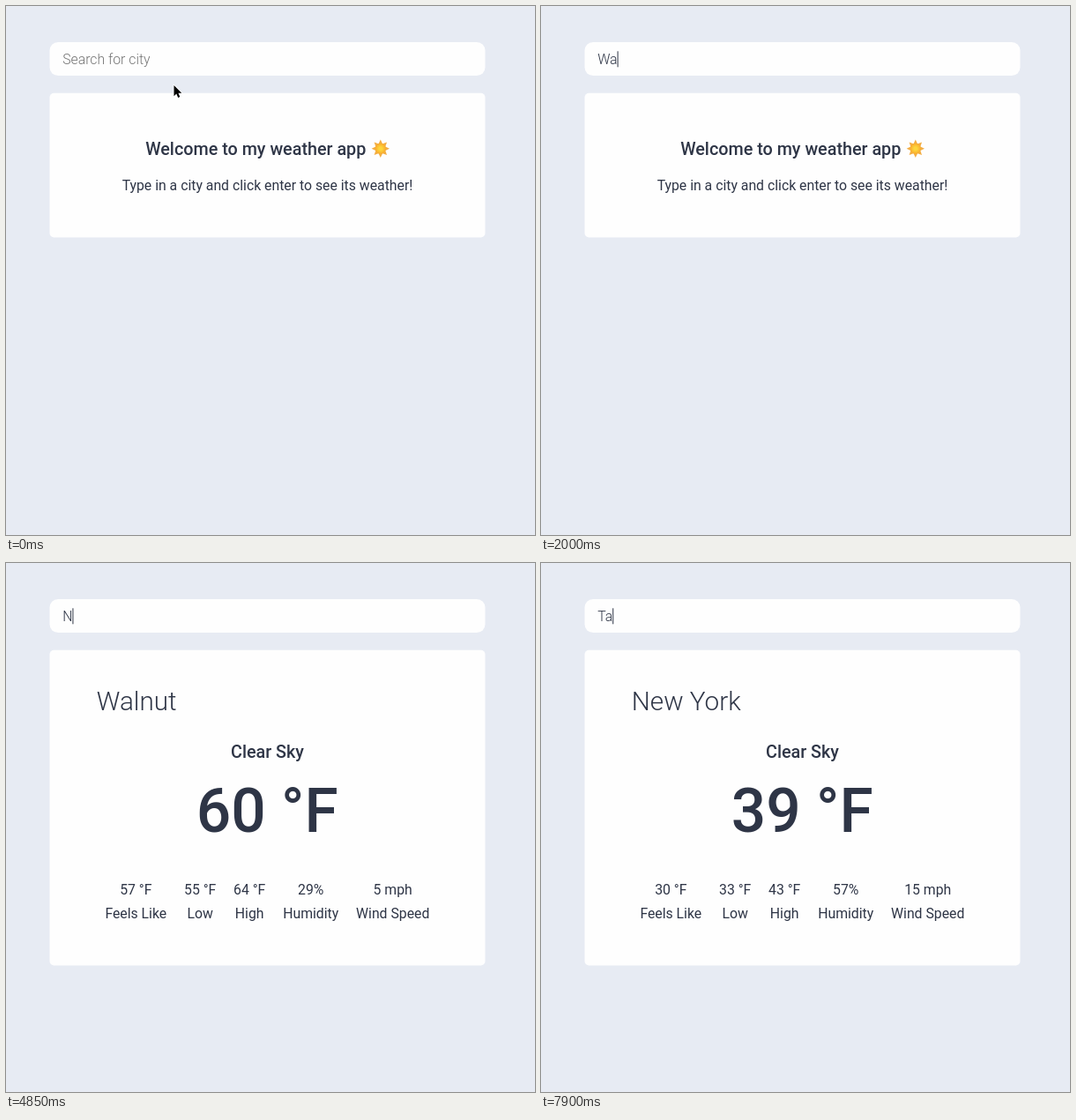
These frames come from a looping animation (600x600 px, 8 s). An HTML page:

```html
<!DOCTYPE html>
<html lang="en">
<head>
<meta charset="utf-8">
<title>Weather app</title>
<style>
  html, body { margin: 0; width: 100%; height: 100%; overflow: hidden; background: #e7ebf3; }
  svg { display: block; width: 100%; height: 100%; }
  text { font: 400 15.81px Roboto, sans-serif; fill: #2e3546; white-space: pre; }
  .mid { text-anchor: middle; }
  .light { font-weight: 300; }
  .head { font-size: 19.76px; font-weight: 500; }
  .city { font-size: 29.64px; font-weight: 300; }
  .temp { font-size: 69.5px; font-weight: 500; }
  .box { fill: #fefefe; }
</style>
</head>
<body>
<svg viewBox="0 0 600 600">
  <defs>
    <radialGradient id="glow">
      <stop offset=".3" stop-color="#fdd53c"/>
      <stop offset="1" stop-color="#f9ab2c"/>
    </radialGradient>
  </defs>
  <rect class="box" x="49.5" y="41" width="494" height="38" rx="9.5"/>
  <rect class="box" id="card" x="49.5" y="98.7" width="494" rx="5"/>

  <text class="light" id="hint" x="64.2" y="66" style="fill:#757575">Search for city</text>
  <text class="light" id="field" x="64.2" y="66" xml:space="preserve"></text>
  <rect id="caret" y="51.3" width="1" height="18" fill="#2e3546"/>

  <g id="welcome">
    <text class="head" x="158.2" y="169">Welcome to my weather app</text>
    <g transform="translate(424.8 161.8)">
      <polygon id="rays" fill="#f3ae45"/>
      <circle r="6" fill="url(#glow)"/>
    </g>
    <text class="mid" x="296.5" y="209.3">Type in a city and click enter to see its weather!</text>
  </g>

  <g id="report">
    <text class="city" id="city" x="102.8" y="166.5"></text>
    <text class="mid head" x="296.5" y="221">Clear Sky</text>
    <text class="mid temp" id="temp" x="296.3" y="305"></text>
    <g id="stats"></g>
  </g>

  <g id="ripple">
    <circle r="8" fill="#000" fill-opacity=".1"/>
    <circle r="5.5" fill="none" stroke="#000" stroke-opacity=".15"/>
  </g>
  <g id="pointer">
    <path id="arrow" d="M0 0V12.2L2.8 9.6 4.7 14 6.8 13.1 4.9 8.8H8.8Z" stroke="#fff" stroke-width="1.4" paint-order="stroke"/>
    <g id="beam" fill="none">
      <path stroke="#fff" stroke-width="2.6" d="M0-6V6"/>
      <path stroke="#000" stroke-width="1.3" d="M-3.8-6.8Q-.5-7 0-5.4Q.5-7 3.8-6.8M0-5.4V5.4M-3.8 6.8Q-.5 7 0 5.4Q.5 7 3.8 6.8M-2 2.6H2"/>
    </g>
  </g>
</svg>
<script>
const $ = id => document.getElementById(id);
const show = (el, on) => el.style.display = on ? '' : 'none';
const clamp = v => Math.max(0, Math.min(1, v));

const LOOP = 8000, STEP = 50, FOCUS = 700;
// [time, key]; Enter submits the field
const keys = [
  [1750, 'W'], [2000, 'a'], [2100, 'l'], [2250, 'n'], [2450, 'u'], [2600, 't'], [3300, 'Enter'],
  [4850, 'N'], [5150, 'e'], [5200, 'w'], [5400, ' '], [5600, 'Y'], [5750, 'o'], [5900, 'r'], [6000, 'k'], [6350, 'Enter'],
  [7600, 'T'], [7900, 'a']
];
const weather = {
  'Walnut': ['60 °F', '57 °F', '55 °F', '64 °F', '29%', '5 mph'],
  'New York': ['39 °F', '30 °F', '33 °F', '43 °F', '57%', '15 mph']
};
const labels = [['Feels Like', 147.3], ['Low', 220.2], ['High', 276.2], ['Humidity', 345.7], ['Wind Speed', 438.7]];
// [time, x, y]
const path = [[0, 190.5, 90], [150, 190.5, 86], [250, 190.5, 86], [450, 178.5, 43.5], [750, 178.5, 43.5], [950, 173.5, 47], [LOOP, 173.5, 47]];

const svgText = (x, y, s = '') => {
  const el = document.createElementNS('http://www.w3.org/2000/svg', 'text');
  el.setAttribute('class', 'mid');
  el.setAttribute('x', x);
  el.setAttribute('y', y);
  el.textContent = s;
  return $('stats').appendChild(el);
};
const values = labels.map(([name, x]) => {
  svgText(x, 403.3, name);
  return svgText(x, 375.5);
});

$('rays').setAttribute('points', Array.from({ length: 16 }, (_, i) => {
  const r = i % 2 ? 6 : 10.2, a = i * Math.PI / 8;
  return [r * Math.cos(a), r * Math.sin(a)];
}).join(' '));

function position(t) {
  const i = path.findIndex(p => p[0] > t);
  const [t0, x0, y0] = path[i - 1], [t1, x1, y1] = path[i];
  const k = (t - t0) / (t1 - t0);
  return [x0 + (x1 - x0) * k, y0 + (y1 - y0) * k];
}

function drawForm(t) {
  let typed = '', city = '', last = FOCUS;
  for (const [time, key] of keys) {
    if (time > t) break;
    if (key === 'Enter') {
      city = typed;
      typed = '';
    } else {
      typed += key;
      last = time;
    }
  }
  $('field').textContent = typed;
  show($('hint'), !typed);
  show($('caret'), t >= FOCUS && (t - last) % 1000 < 500);
  $('caret').setAttribute('x', 64.2 + (typed ? $('field').getComputedTextLength() : 0));

  show($('welcome'), !city);
  show($('report'), city);
  $('card').setAttribute('height', city ? 357.7 : 163.7);
  if (city) {
    const [temp, ...rest] = weather[city];
    $('city').textContent = city;
    $('temp').textContent = temp;
    values.forEach((el, i) => el.textContent = rest[i]);
  }
}

function drawPointer(t) {
  const [x, y] = position(t);
  $('pointer').setAttribute('transform', `translate(${x} ${y})`);
  $('pointer').setAttribute('opacity', clamp((1200 - t) / 200));
  show($('arrow'), y > 79);
  show($('beam'), y <= 79);

  const k = (t - 650) / 400;
  show($('ripple'), k > 0 && k < 1);
  $('ripple').setAttribute('transform', `translate(177.5 43.5) scale(${0.5 + 0.5 * clamp(k * 1.4)})`);
  $('ripple').setAttribute('opacity', clamp(1.3 * (1 - k)));
}

function frame() {
  const t = Math.floor(performance.now() % LOOP / STEP) * STEP;
  drawForm(t);
  drawPointer(t);
  requestAnimationFrame(frame);
}
frame();
</script>
</body>
</html>
```
